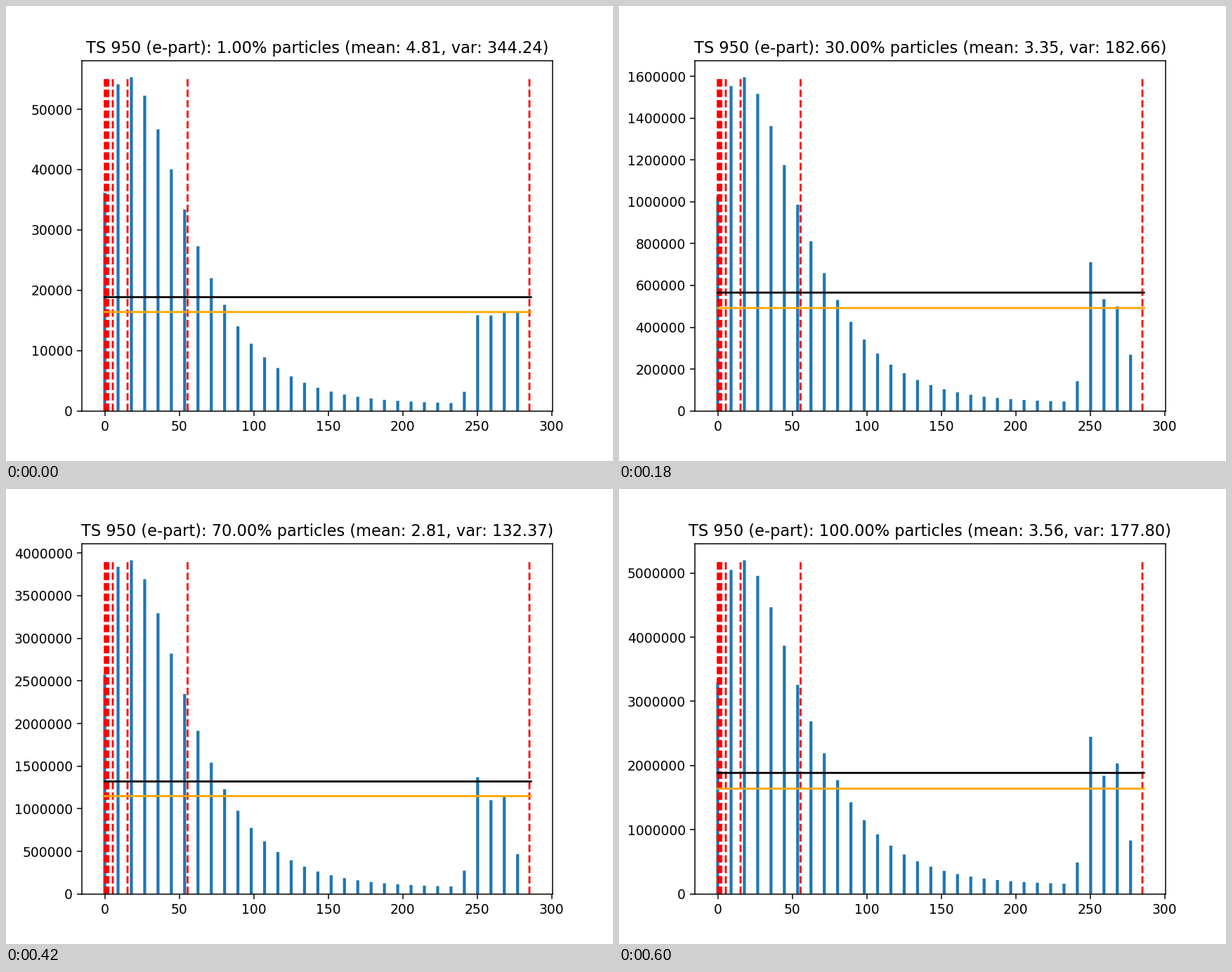
Recreate the animation shown at these times as a matplotlib script. Size 864 px wide and 648 px high, loop 630 ms.

```python
import numpy as np
import matplotlib.pyplot as plt
from matplotlib.animation import FuncAnimation

plt.rcParams["text.kerning_factor"] = 6

FRAMES, INTERVAL = 21, 30
X_MAX, BINS = 286, 32
MEAN_PER_PCT = 16400          # average bin height for one percent of particles
MARKS = [0, 0.6, 1.2, 1.8, 2.4, 5.4, 15.3, 55.6, 285]

# Key points over the run; the late bins are fractions of the peak.
PERCENT = [1, 10, 30, 50, 70, 90, 100]
MEAN = [4.81, 4.97, 3.35, 3.13, 2.81, 3.55, 3.56]
VAR = [344.24, 301.63, 182.66, 155.79, 132.37, 177.28, 177.80]
PEAK_PER_PCT = [55300, 50100, 53170, 55180, 55940, 52950, 51980]
LATE = [
    [0.287, 0.451, 0.446, 0.373, 0.350, 0.440, 0.471],
    [0.286, 0.431, 0.335, 0.297, 0.281, 0.342, 0.354],
    [0.295, 0.475, 0.313, 0.325, 0.293, 0.392, 0.391],
]


def histogram(percent, peak_per_pct, late):
    """A hump with an exponential tail, then a second rise in the last bins."""
    spread = (55500 - peak_per_pct) / 5400    # a lower peak has a fatter tail
    floor = 0.02 + 0.01 * spread
    rate = 0.268 - 0.014 * spread

    i = np.arange(BINS)
    shape = np.exp(-rate * i - 1.45 * 0.725 ** i)
    shape = floor + (1 - floor) * shape / shape.max()
    shape[0] = 0.655 - 0.03 * spread
    shape[27] = 0.2 * late[0]
    shape[28:31] = late
    shape[31] = late[0] * (0.34 + 0.69 * np.exp((1 - percent) / 10))
    return shape * percent * peak_per_pct


COUNTS = np.array([histogram(*key) for key in zip(PERCENT, PEAK_PER_PCT, zip(*LATE))])

fig, ax = plt.subplots(figsize=(6.4, 4.8), dpi=135)
bin_x = np.linspace(0, X_MAX, BINS + 1)[:-1]


def line(xs, ys, color, style="-"):
    ax.plot(xs, ys, color=color, ls=style, lw=1.5, snap=False)


def draw(i):
    percent = max(1, 5 * i)
    counts = np.array([np.interp(percent, PERCENT, c) for c in COUNTS.T])
    mean = np.interp(percent, PERCENT, MEAN)
    var = np.interp(percent, PERCENT, VAR)
    peak = counts.max()
    level = MEAN_PER_PCT * percent

    ax.clear()
    ax.bar(bin_x, counts, width=2, color="#1f77b4", snap=False)
    for x in MARKS:
        line([x, x], [0, peak], "red", "--")
    line([0, X_MAX], [level * 1.15] * 2, "black")
    line([0, X_MAX], [level] * 2, "orange")
    ax.set_xlim(-15.35, 300.35)
    ax.set_ylim(0, peak * 1.05)
    ax.ticklabel_format(style="plain", useOffset=False)
    ax.set_title(f"TS 950 (e-part): {percent:.2f}% particles "
                 f"(mean: {mean:.2f}, var: {var:.2f})")
    return []


anim = FuncAnimation(fig, draw, frames=FRAMES, interval=INTERVAL,
                     repeat=True, repeat_delay=0)
plt.show()
```
